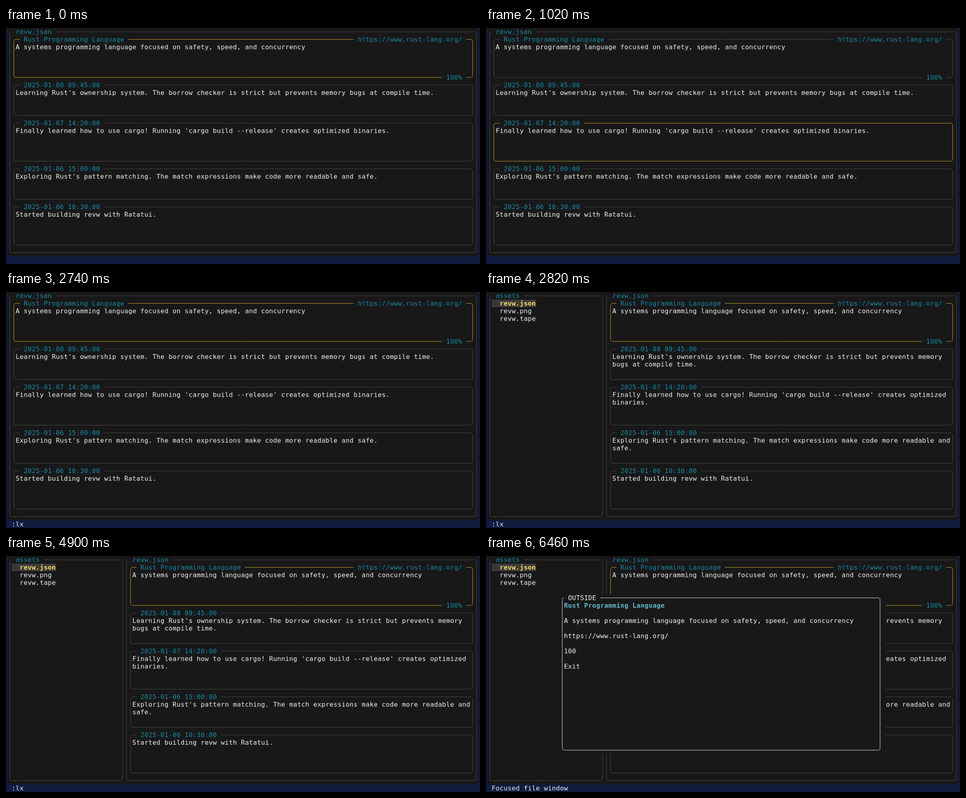
Write an HTML page with a canvas that moves like this. It is 1058 px wide and 529 px high and loops after 8000 ms.

```html
<!DOCTYPE html>
<html lang="en">
<head>
<meta charset="utf-8">
<title>revw</title>
<style>
  html, body { margin: 0; width: 100%; height: 100%; overflow: hidden; background: #0f1c3f; }
  canvas { display: block; width: 1058px; height: 529px; }
</style>
</head>
<body>
<canvas id="stage" width="1058" height="529"></canvas>
<script>
const LOOP = 8000;

// The terminal is drawn on a whole-pixel cell grid, then scaled to the stage
const LEFT = 4, CW = 10, CH = 19, COLS = 117, ROWS = 30;
const BASELINE = 15;
const FONT = '16px "DejaVu Sans Mono", monospace';

const stage = document.getElementById('stage');
const out = stage.getContext('2d');
out.imageSmoothingQuality = 'high';
const screen = document.createElement('canvas');
screen.width = COLS * CW + 2 * LEFT;
screen.height = (ROWS + 1) * CH;
const ctx = screen.getContext('2d');

const C = {
  navy: '#0f1c3f', bg: '#181818', text: '#f4f4f4', border: '#4a4a4a',
  active: '#d0aa2e', title: '#1688a7', popTitle: '#64b8cf',
  pick: '#ffe066', pickBg: '#3a3a3a', popBorder: '#f4f4f4'
};

const LINK = 'https://www.rust-lang.org/';
const HEAD = 'Rust Programming Language';
const ABOUT = 'A systems programming language focused on safety, speed, and concurrency';
const CARDS = [
  { top: 1, bottom: 6, title: HEAD, body: ABOUT, link: LINK, score: '100%' },
  { top: 7, bottom: 11, title: '2025-01-08 09:45:00',
    body: "Learning Rust's ownership system. The borrow checker is strict but prevents memory bugs at compile time." },
  { top: 12, bottom: 17, title: '2025-01-07 14:20:00',
    body: "Finally learned how to use cargo! Running 'cargo build --release' creates optimized binaries." },
  { top: 18, bottom: 22, title: '2025-01-06 15:00:00',
    body: "Exploring Rust's pattern matching. The match expressions make code more readable and safe." },
  { top: 23, bottom: 28, title: '2025-01-06 10:30:00',
    body: 'Started building revw with Ratatui.' }
];
const FILES = ['revw.json', 'revw.png', 'revw.tape'];

// Timelines: [start ms, value]
const CARD_AT = [[0, 0], [500, 1], [1020, 2], [1580, 1], [2100, 0]];
const STATUS_AT = [[0, ''], [2660, ':'], [2700, ':l'], [2740, ':lx'], [5940, 'Focused file window']];
const FILE_AT = [[0, 0], [3260, 1], [3820, 2], [4340, 1], [4900, 0]];
const PANE_AT = 2820, POPUP_AT = 6460;

const at = (steps, t) => steps.filter(s => s[0] <= t).pop()[1];
const px = col => LEFT + col * CW;
const py = row => row * CH;

function fill(col, row, cols, rows, color) {
  ctx.fillStyle = color;
  ctx.fillRect(px(col), py(row), cols * CW, rows * CH);
}

function write(str, col, row, color = C.text, bold = false) {
  ctx.font = (bold ? 'bold ' : '') + FONT;
  ctx.fillStyle = color;
  [...str].forEach((ch, i) => {
    if (ch !== ' ') ctx.fillText(ch, px(col + i), py(row) + BASELINE);
  });
}

function frame(c0, r0, c1, r1, color) {
  ctx.strokeStyle = color;
  ctx.lineWidth = 1;
  ctx.beginPath();
  ctx.roundRect(px(c0) + 5.5, py(r0) + 9.5, (c1 - c0) * CW, (r1 - r0) * CH, 5);
  ctx.stroke();
}

// Text sitting on a border, with a blank cell on each side
function label(str, col, row, color = C.title) {
  fill(col - 1, row, str.length + 2, 1, C.bg);
  write(str, col, row, color);
}

function wrap(str, width) {
  const lines = [''];
  for (const word of str.split(' ')) {
    const last = lines[lines.length - 1];
    const next = last ? last + ' ' + word : word;
    if (next.length <= width) lines[lines.length - 1] = next;
    else lines.push(word);
  }
  return lines;
}

function drawCards(col, active) {
  const right = COLS - 2;
  frame(col, 0, COLS - 1, ROWS - 1, C.border);
  label('revw.json', col + 2, 0);
  CARDS.forEach((card, i) => {
    frame(col + 1, card.top, right, card.bottom, i === active ? C.active : C.border);
    label(card.title, col + 4, card.top);
    if (card.link) label(card.link, right - 2 - card.link.length, card.top);
    if (card.score) label(card.score, right - 2 - card.score.length, card.bottom);
    wrap(card.body, right - col - 2).forEach((line, n) => write(line, col + 2, card.top + 1 + n));
  });
}

function drawFiles(picked) {
  frame(0, 0, 28, ROWS - 1, C.border);
  label('assets', 2, 0);
  FILES.forEach((name, i) => {
    const on = i === picked;
    if (on) fill(1, i + 1, name.length + 2, 1, C.pickBg);
    write(name, 3, i + 1, on ? C.pick : C.text, on);
  });
}

function drawPopup() {
  fill(18, 5, 81, 21, C.bg);
  frame(18, 5, 97, 25, C.popBorder);
  label('OUTSIDE', 20, 5, C.text);
  write(HEAD, 19, 6, C.popTitle, true);
  [ABOUT, LINK, '100', 'Exit'].forEach((line, i) => write(line, 19, 8 + 2 * i));
}

function draw(t) {
  ctx.fillStyle = C.navy;
  ctx.fillRect(0, 0, screen.width, screen.height);
  fill(0, 0, COLS, ROWS, C.bg);
  const split = t >= PANE_AT;
  drawCards(split ? 29 : 0, at(CARD_AT, t));
  if (split) drawFiles(at(FILE_AT, t));
  if (t >= POPUP_AT) drawPopup();
  write(at(STATUS_AT, t), 1, ROWS);
  out.drawImage(screen, 0, 0, stage.width, stage.height);
}

const start = performance.now();
function tick() {
  draw((performance.now() - start) % LOOP);
  requestAnimationFrame(tick);
}
tick();
</script>
</body>
</html>
```
